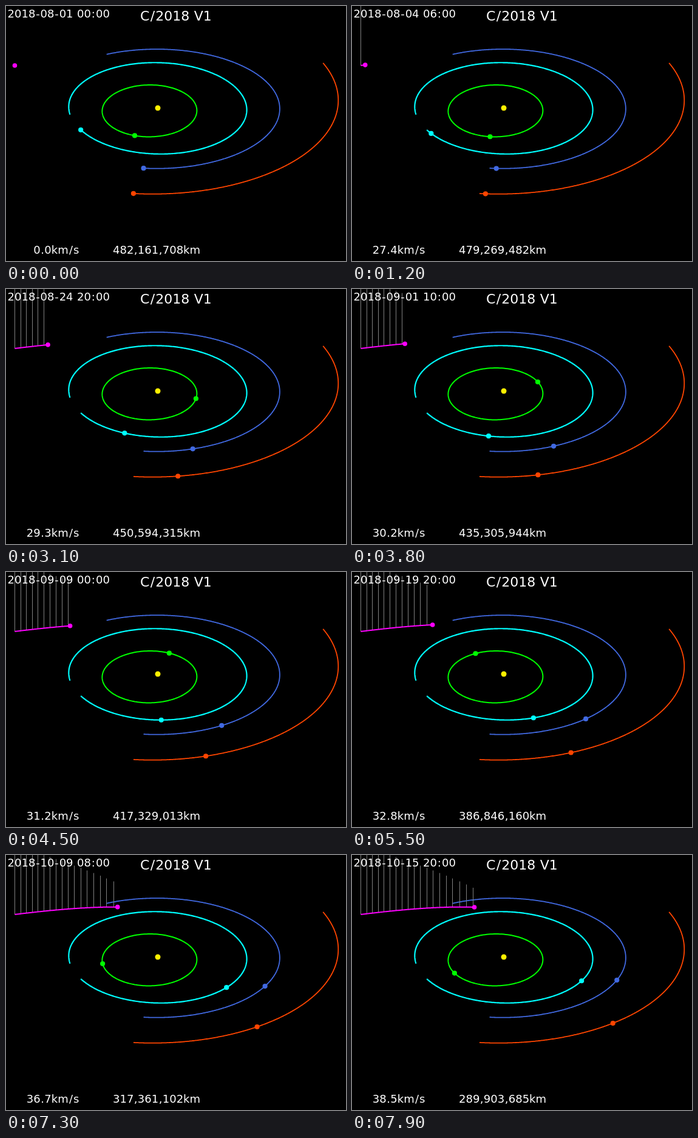
Recreate the animation shown at these times as an HTML page with a canvas. Size 560x420 px, loop 8 s.

```html
<!DOCTYPE html>
<html lang="en">
<head>
<meta charset="utf-8">
<title>C/2018 V1</title>
<style>
html, body { margin: 0; width: 100%; height: 100%; overflow: hidden; background: #000; }
canvas { display: block; }
</style>
</head>
<body>
<canvas id="stage" width="560" height="420"></canvas>
<script>
const ctx = document.getElementById('stage').getContext('2d');
const { sin, cos, sqrt, PI } = Math;
const RAD = PI / 180;
const SUN = { x: 250, y: 168 };
const LOOP = 8000, HOLD = 1000, STEP = 100, HOURS = 26, SPAN = 212;
const START = Date.UTC(2018, 7, 1);

// a: AU, lon: mean longitude at start, n: degrees per day, peri/node/inc: degrees
const planets = [
  { color: '#00ff00', a: 0.3871, e: 0.20563, lon: 304.871, n: 4.09234, peri: 77.487, node: 48.33, inc: 7.005, width: 2 },
  { color: '#00ffff', a: 0.72333, e: 0.00677, lon: 254.824, n: 1.60213, peri: 131.603, node: 76.68, inc: 3.394, width: 2.2 },
  { color: '#4169e1', a: 1, e: 0.0167, lon: 309.292, n: 0.985609, peri: 102.998, node: 0, inc: 0, width: 1.8 },
  { color: '#ff4500', a: 1.52368, e: 0.0934, lon: 311.79, n: 0.52403, peri: -23.86, node: 49.56, inc: 1.85, width: 1.8 }
];

// Oblique view of the ecliptic, turned by 45 degrees
function planetAt(p, day) {
  const M = (p.lon + p.n * day - p.peri) * RAD;
  let E = M;
  for (let i = 0; i < 12; i++) E = M + p.e * sin(E);
  const r = p.a * (1 - p.e * cos(E));
  const nu = Math.atan2(sqrt(1 - p.e * p.e) * sin(E), cos(E) - p.e);
  const lon = nu + p.peri * RAD;
  const z = r * sin(p.inc * RAD) * sin(lon - p.node * RAD);
  const u = lon - PI / 4;
  return { x: SUN.x + 202.7 * r * cos(u), y: SUN.y - 98.3 * r * sin(u) - 113 * z };
}

// Parabolic orbit: tangent of half the true anomaly, by Barker's equation
const barker = daysLeft => 2 * Math.sinh(Math.asinh(1.5 * daysLeft / 19.79) / 3);

function cometAt(day) {
  const s = barker(124 - day), c = 1 - s * s;
  return {
    x: SUN.x + 62.87 * c + 13.145 * s,
    y: SUN.y - 23.87 * c - 74.74 * s,
    height: -25.4 * c + 2.6 * s
  };
}

function speedAt(day) {
  const s = barker(124.54 - day);
  return sqrt(2.65424e11 / (0.387 * 1.495979e8 * (1 + s * s)));
}

const ranges = [
  [0, 482161708], [11, 469408097], [22, 450594315], [36, 417329013],
  [46, 386846160], [57, 346647263], [70, 289903685]
];

// Smooth polynomial through the known distances
function rangeAt(step) {
  return Math.round(ranges.reduce((sum, [xi, yi]) =>
    sum + ranges.reduce((v, [xj]) => xj === xi ? v : v * (step - xj) / (xi - xj), yi), 0));
}

function curve(at, days, dt) {
  const path = new Path2D();
  for (let d = 0; d < days; d += dt) {
    const p = at(d);
    path.lineTo(p.x, p.y);
  }
  const end = at(days);
  path.lineTo(end.x, end.y);
  return path;
}

for (const p of planets) {
  p.path = curve(d => planetAt(p, d), Math.min(SPAN, 360 / p.n), 0.5);
}

function stroke(path, color, width) {
  ctx.strokeStyle = color;
  ctx.lineWidth = width;
  ctx.stroke(path);
}

function dot({ x, y }, r, color) {
  ctx.fillStyle = color;
  ctx.beginPath();
  ctx.arc(x, y, r, 0, 2 * PI);
  ctx.fill();
}

// Words are centred on the given x positions
function row(words, xs, size, y) {
  ctx.font = `${size}px "DejaVu Sans", sans-serif`;
  ctx.textAlign = 'center';
  ctx.fillStyle = '#fff';
  words.forEach((w, i) => ctx.fillText(w, xs[i], y));
}

function drawComet(day) {
  if (day > 0) {
    ctx.fillStyle = '#808080';
    for (let d = 0; d <= day; d += 100 / 24) {
      const p = cometAt(d);
      ctx.fillRect(Math.round(p.x), p.y - p.height, 1, p.height);
    }
    stroke(curve(cometAt, day, 0.5), '#ff00ff', 2);
  }
  dot(cometAt(day), 3.8, '#ff00ff');
}

function drawText(step, day) {
  const iso = new Date(START + step * HOURS * 3600000).toISOString();
  const [year, month, date, hour, minute] = iso.split(/[-T:]/);
  row([year, '-', month, '-', date, hour, ':', minute],
    [25.5, 52.5, 68, 83.6, 99.1, 128.4, 143.9, 159.4], 18, 19);
  row(['C', '/', '2018', 'V1'], [228.7, 241.4, 274.2, 324.2], 22, 23.5);

  const [whole, tenth] = (step ? speedAt(day) : 0).toFixed(1).split('.');
  row([whole, '.', tenth, 'km', '/', 's'],
    [56.7 - 5.7 * whole.length, 60, 69, 88.8, 107, 115.8], 18, 408);
  const [a, b, c] = rangeAt(step).toLocaleString('en-US').split(',');
  row([a, ',', b, ',', c, 'km'], [193.2, 213.6, 234, 254.5, 274.9, 306.1], 18, 408);
}

function draw(now) {
  const t = now % LOOP;
  const step = t < HOLD ? 0 : Math.floor((t - HOLD) / STEP) + 1;
  const day = step * HOURS / 24;
  ctx.fillStyle = '#000';
  ctx.fillRect(0, 0, 560, 420);
  for (const p of planets) stroke(p.path, p.color, p.width);
  dot(SUN, 4.5, '#fff000');
  for (const p of planets) dot(planetAt(p, day), 4.1, p.color);
  drawComet(day);
  drawText(step, day);
}

const origin = performance.now();
function tick() {
  draw(performance.now() - origin);
  requestAnimationFrame(tick);
}
tick();
</script>
</body>
</html>
```
